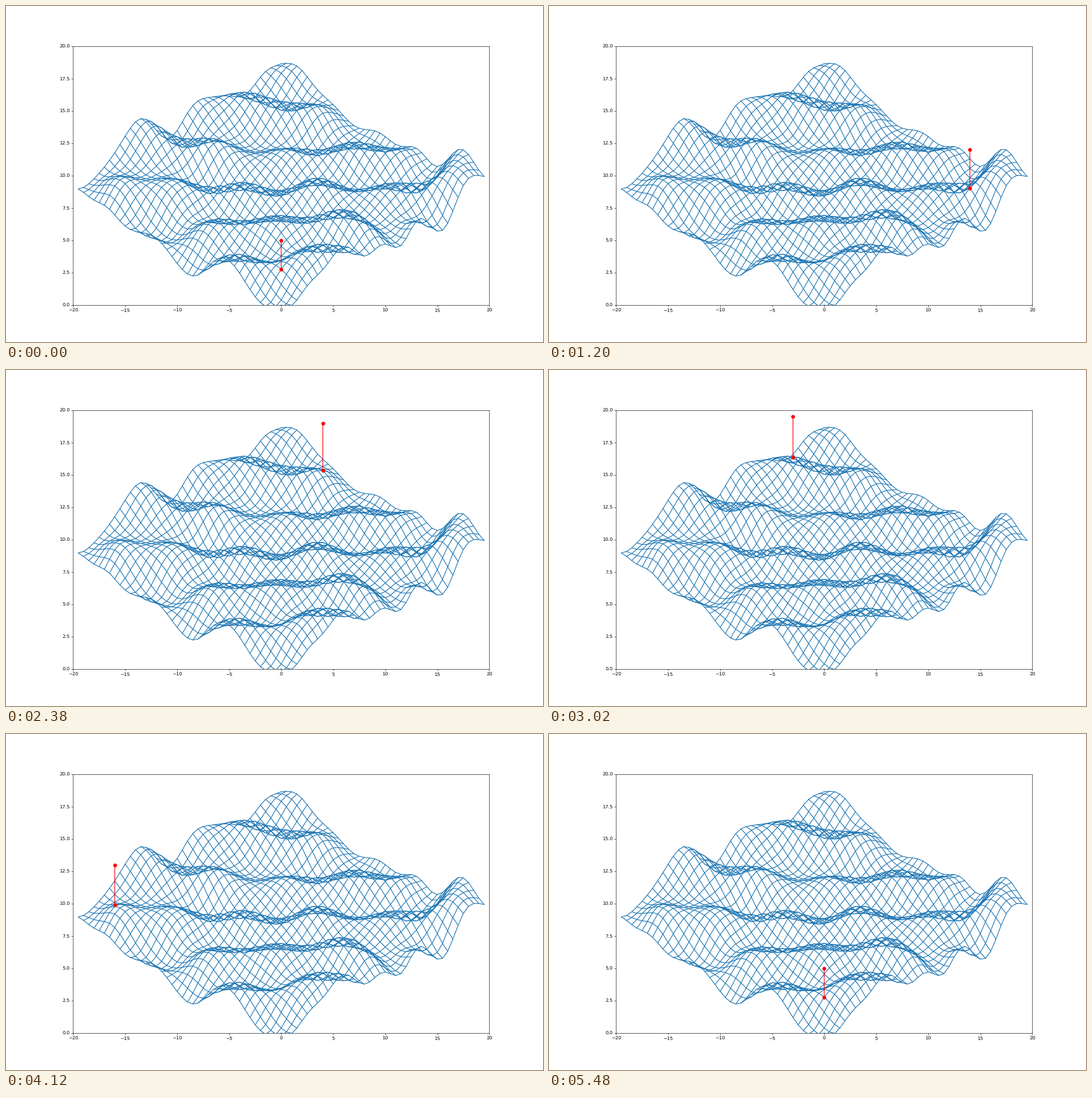
Recreate the animation shown at these times as a matplotlib script. Size 947 by 592 pixels, loop 5520 ms.

```python
import matplotlib.pyplot as plt
import numpy as np
from matplotlib.animation import FuncAnimation

plt.rcParams["text.hinting"] = "none"

N = 40
DPI = 59.2
TICK = 20                      # ms per frame
LOW, HIGH, HOVER = 4, 36, 3    # square walk and height of the upper marker
SIDE = HIGH - LOW
SWELL, PERIOD = .75, 13        # waves that roll from front to back

# hills and hollows: i, j, height, radius
HILLS = [
    (11, 1, .9, 8), (23, 0, -1.8, 3), (32, 0, -1, 3.5),
    (39, 4, 1.9, 3.5), (39, 10, -2, 3.5), (39, 24, -2.3, 5),
    (39, 34, -.8, 4), (35, 39, -1.5, 4), (20, 39, -.7, 4),
    (11, 39, .9, 6), (0, 36, -1.9, 3), (0, 27, -.9, 4),
    (0, 20, -1.8, 5), (27, 25, -1.2, 10), (15, 26, -.8, 8),
    (31, 11, -.9, 7),
]


def terrain(i, j):
    bend = .7 * (1 - np.cos(np.pi * (i - j) / 10))
    z = -SWELL * np.sin(2 * np.pi * (i + j - bend) / PERIOD)
    for a, b, height, radius in HILLS:
        z += height * np.exp(-((i - a) ** 2 + (j - b) ** 2) / radius ** 2)
    rng = np.random.default_rng(4)
    for _ in range(5):
        angle, phase = rng.uniform(0, 2 * np.pi, 2)
        along = i * np.cos(angle) + j * np.sin(angle)
        z += .1 * np.sin(2 * np.pi * along / rng.uniform(5, 9) + phase)
    return z


def iso(i, j, z):
    return (i - j) / 2, (i + j) / 4 + z


def walk(step):
    """Grid cell after a number of steps around the square."""
    side, k = divmod(step % (4 * SIDE), SIDE)
    return [(LOW + k, LOW), (HIGH, LOW + k),
            (HIGH - k, HIGH), (LOW, HIGH - k)][side]


def hold(step):
    """Ticks a step stays on screen, longest at the far corner."""
    ticks = 2 + (step % 8 == 0 and step < 4 * SIDE)
    return ticks + 2 * (step == 2 * SIDE)


schedule = [s for s in range(4 * SIDE + 1) for _ in range(hold(s))]

I, J = np.indices((N, N))
X, Y = iso(I, J, terrain(I, J))

fig, ax = plt.subplots(figsize=(947.001 / DPI, 592.001 / DPI), dpi=DPI)
ax.plot(X, Y, color="C0")
ax.plot(X.T, Y.T, color="C0")
pole, = ax.plot([], [], "ro-", markersize=7, zorder=5, snap=False)
ax.set_xlim(-20, 20)
ax.set_ylim(0, 20)


def update(n):
    i, j = walk(schedule[n])
    x, top = iso(i, j, HOVER)
    pole.set_data([x, x], [top, Y[i, j]])
    return pole,


anim = FuncAnimation(fig, update, frames=len(schedule), interval=TICK,
                     repeat=True, repeat_delay=0, blit=True)
plt.show()
```
